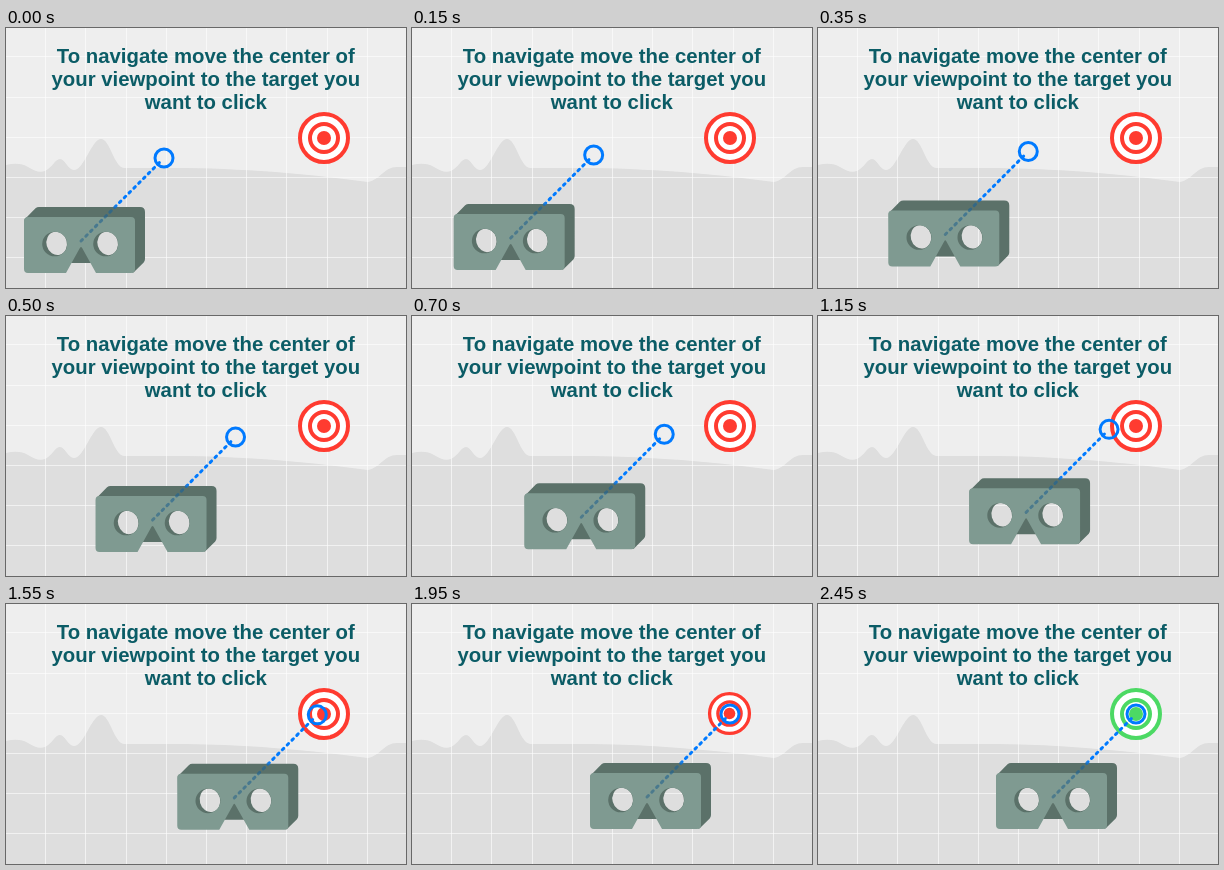
Animation, 400 px wide and 260 px high, one loop 3050 ms. Source, as an HTML page:

```html
<!DOCTYPE html>
<html lang="en">
<head>
<meta charset="utf-8">
<title>Navigate by viewpoint</title>
<style>
  html, body { margin: 0; width: 100%; height: 100%; overflow: hidden; background: #eee; }
  svg { display: block; width: 100vw; height: 100vh; }
  text { font: bold 20.35px "Liberation Sans", Arial, sans-serif; fill: #0b5c66; text-anchor: middle; }
</style>
</head>
<body>
<svg viewBox="0 0 400 260">
  <defs>
    <linearGradient id="fade" gradientUnits="userSpaceOnUse" x1="75" y1="213" x2="158" y2="130">
      <stop offset="0" stop-color="#1d5c86" stop-opacity=".5"/>
      <stop offset=".38" stop-color="#1d6396" stop-opacity=".65"/>
      <stop offset=".43" stop-color="#007aff"/>
    </linearGradient>
  </defs>

  <rect width="400" height="260" fill="#eee"/>
  <path fill="#dedede" d="M0 137C8 135 16 135 22 139C29 143 33 145 39 143C46 140 49 131 54 131C59 131 62 142 68 142C78 142 86 111 95 111C104 111 108 139 118 140L180 140C250 141 310 147 362 154C374 152 378 139 391 139L400 139V260H0Z"/>
  <path id="grid" stroke="#fff" stroke-opacity=".6" fill="none"/>

  <text x="199.8" y="35">To navigate move the center of</text>
  <text x="199.8" y="58">your viewpoint to the target you</text>
  <text x="199.8" y="81">want to click</text>

  <g id="target">
    <circle r="24" fill="#fff"/>
    <circle r="24" fill="none" stroke="currentColor" stroke-width="4"/>
    <circle r="14" fill="none" stroke="currentColor" stroke-width="4"/>
    <circle r="7" fill="currentColor"/>
  </g>

  <g id="viewer">
    <path id="back" fill="#5b7169" fill-rule="evenodd"/>
    <path id="front" fill="#7f9a91" fill-rule="evenodd"/>
    <path d="M75 213L156.5 131.5" fill="none" stroke="url(#fade)" stroke-width="3" stroke-linecap="round" stroke-dasharray="2 4.8"/>
    <circle cx="158" cy="130" r="9" fill="none" stroke="#007aff" stroke-width="3"/>
  </g>
</svg>
<script>
  const LOOP = 3050, STEP = 50;
  const RED = [255, 59, 48], GREEN = [76, 217, 100];
  const $ = id => document.getElementById(id);
  const ramp = (t, from, to) => Math.min(1, Math.max(0, (t - from) / (to - from)));
  const mix = (a, b, k) => a + (b - a) * k;

  // Ellipse outline, tilted by the given degrees
  function hole(x, y, rx, ry, tilt) {
    const a = tilt * Math.PI / 180, dx = rx * Math.cos(a), dy = rx * Math.sin(a);
    const arc = `a${rx} ${ry} ${tilt} 1 0 `;
    return `M${x - dx} ${y - dy}${arc}${2 * dx} ${2 * dy}${arc}${-2 * dx} ${-2 * dy}Z`;
  }
  const lenses = (x, y, rx, ry, tilt = 0) =>
    hole(x, y, rx, ry, tilt) + hole(x + 51, y, rx, ry, tilt);

  let lines = "";
  for (let x = 39.6; x < 400; x += 40.2) lines += `M${Math.floor(x) + .5} 0V260`;
  for (let y = 28.9; y < 260; y += 40.1) lines += `M0 ${Math.floor(y) + .5}H400`;
  $("grid").setAttribute("d", lines);

  $("back").setAttribute("d",
    "M18.5 191.5L29.5 180.3Q31 179 33 179H134Q139 179 139 184V231Q139 233 137.7 234.4L127.5 244.5H126V235H19Z" +
    lenses(50.7, 215.4, 10.2, 11.8, -15));
  $("front").setAttribute("d",
    "M22 189H125Q129 189 129 193V241Q129 245 125 245H90L76 219.8Q75 218 74 219.8L60 245H22Q18 245 18 241V193Q18 189 22 189Z" +
    lenses(48.7, 216, 12.5, 12.3));

  function draw(ms) {
    const t = Math.floor((ms % LOOP) / STEP) * STEP;
    const move = 1 - (1 - ramp(t, 0, 1950)) ** 2;
    $("viewer").setAttribute("transform", `translate(${160 * move} ${-20 * move})`);

    const release = ramp(t, 2250, 2450);
    const press = ramp(t, 1750, 1950) - release;
    const shift = -.5 * press;
    $("target").setAttribute("transform", `translate(${318 + shift} ${110 + shift}) scale(${1 - .17 * press})`);
    $("target").setAttribute("color", `rgb(${RED.map((c, i) => Math.round(mix(c, GREEN[i], release)))})`);
  }

  let start;
  function tick(now) {
    start ??= now;
    draw(now - start);
    requestAnimationFrame(tick);
  }
  draw(0);
  requestAnimationFrame(tick);
</script>
</body>
</html>
```
